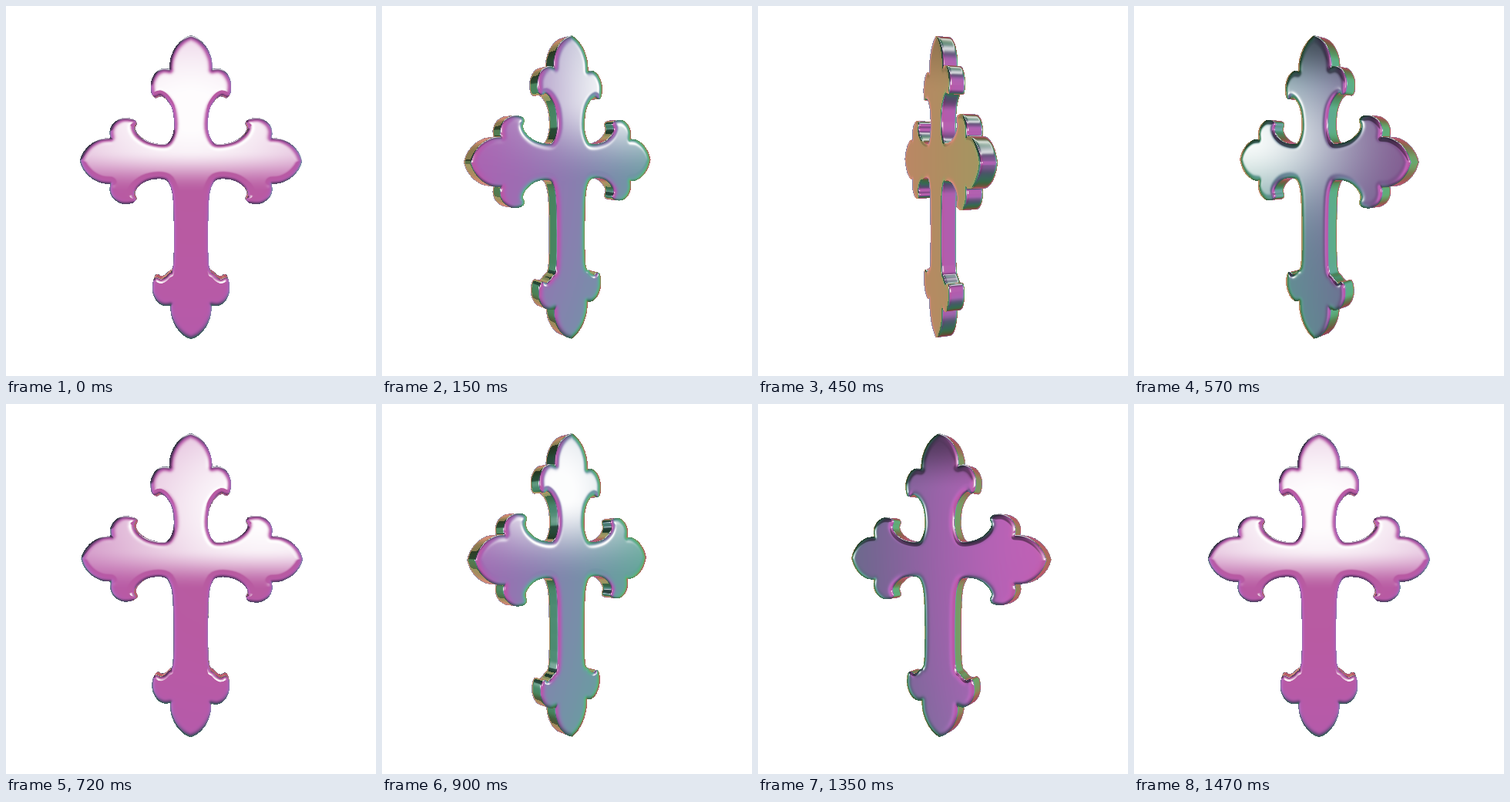
Write an HTML page with a canvas that moves like this. It is 480x480 px and loops after 1.5 s.

```html
<!DOCTYPE html>
<html>
<head>
<meta charset="utf-8">
<title>Turning cross</title>
<style>
html, body { margin: 0; width: 100%; height: 100%; overflow: hidden; background: #fff; }
canvas { display: block; }
</style>
</head>
<body>
<canvas id="stage" width="480" height="480"></canvas>
<script>
const ctx = document.getElementById('stage').getContext('2d');
const STEP = 30, LOOP = 1500, TURN_STEPS = 49;
const CENTER_X = 239.5, EYE_Y = 187, EYE_Z = 740, HALF = 10;
const BOX = { x: 88, y: 34, w: 304, h: 402 };
const GRID = { w: 170, h: 420, y: 25 };

// Half of one fleur end as [across, depth from tip]; all four arms share it.
const LOBE = [[0, 0], [10, 5], [20, 15.5], [26.5, 30], [28, 44]];
const EAR = [[28, 44], [37, 43.5], [46, 49], [52, 61], [51.5, 75], [47, 80.5], [40, 78], [31.5, 84], [24, 98]];

const clamp = (v, lo, hi) => v < lo ? lo : v > hi ? hi : v;
const bump = (v, mid, width) => Math.exp(-(((v - mid) / width) ** 2));
const smooth = (lo, hi, v) => {
  const t = clamp((v - lo) / (hi - lo), 0, 1);
  return t * t * (3 - 2 * t);
};

function spline(a, b, c, d, t) {
  return b + t / 2 * (c - a + t * (2 * a - 5 * b + 4 * c - d + t * (3 * (b - c) + d - a)));
}

// Right half of the outline: smooth runs that meet in corners.
function outlineRuns() {
  const top = ([a, d]) => [a, 37 + d];
  const upper = ([a, d]) => [144.5 - .9 * d, 200.5 - 1.07 * a];
  const lower = ([a, d]) => [144.5 - .9 * d, 200.5 + 1.07 * a];
  const bottom = ([a, d]) => [.96 * a, 432 - d];
  const back = (points, place) => points.map(place).reverse();
  return [
    LOBE.map(top),
    [...EAR.map(top), [22, 158], [28, 175], [38, 178.5], ...back(EAR, upper)],
    back(LOBE, upper),
    LOBE.map(lower),
    [...EAR.map(lower), [38, 224], [28, 231], [23, 258], ...back(EAR, bottom)],
    back(LOBE, bottom)
  ];
}

function traceOutline() {
  const path = [];
  for (const run of outlineRuns()) {
    for (let i = 0; i < run.length - 1; i++) {
      const p = [run[Math.max(i - 1, 0)], run[i], run[i + 1], run[Math.min(i + 2, run.length - 1)]];
      for (let k = 0; k < 4; k++) {
        path.push([0, 1].map(axis => spline(p[0][axis], p[1][axis], p[2][axis], p[3][axis], k / 4)));
      }
    }
  }
  path.push([0, 432]);
  return path;
}

function buildDistances() {
  const path = traceOutline(), out = new Float32Array(GRID.w * GRID.h);
  const edges = path.slice(1).map(([bx, by], i) => {
    const [ax, ay] = path[i], dx = bx - ax, dy = by - ay;
    return { ax, ay, by, dx, dy, inv: 1 / (dx * dx + dy * dy) };
  });
  for (let j = 0; j < GRID.h; j++) {
    const y = j + GRID.y;
    for (let x = 0; x < GRID.w; x++) {
      let best = 1e9, inside = false;
      for (const e of edges) {
        const px = x - e.ax, py = y - e.ay;
        const t = clamp((px * e.dx + py * e.dy) * e.inv, 0, 1);
        const qx = px - t * e.dx, qy = py - t * e.dy, q = qx * qx + qy * qy;
        if (q < best) best = q;
        if ((e.ay > y) !== (e.by > y) && px < py * e.dx / e.dy) inside = !inside;
      }
      out[j * GRID.w + x] = Math.sqrt(best) * (inside ? -1 : 1);
    }
  }
  return out;
}

const distances = buildDistances();

function distance(x, y) {
  x = clamp(Math.abs(x), 0, GRID.w - 1.01);
  y = clamp(y - GRID.y, 0, GRID.h - 1.01);
  const i = x | 0, j = y | 0, u = x - i, v = y - j, k = j * GRID.w + i;
  const top = distances[k] + (distances[k + 1] - distances[k]) * u;
  const low = distances[k + GRID.w] + (distances[k + GRID.w + 1] - distances[k + GRID.w]) * u;
  return top + (low - top) * v;
}

// Thin-film colour: each channel is a wave over the cosine of the viewing angle.
function film(cosine) {
  const wave = (mid, swing, peak, period) => mid + swing * Math.cos(2 * Math.PI * (cosine - peak) / period);
  return [wave(138, 46, .99, .78), wave(132, 42, .58, .78), wave(134, 44, .85, 1)];
}
const filmTable = Array.from({ length: 256 }, (_, i) => film(i / 255));

// Studio lights seen in the reflected direction (y points up).
function lights(x, y, z) {
  let white = 0, shade = 1 - .4 * smooth(.3, .9, Math.abs(y));
  if (z > 0) white += smooth(-.075, 0, y) * bump(y, .07, .25) * bump(x, 0, .35);
  if (x > 0) {
    white += smooth(-.06, .09, y) * bump(y, .1, .22) * bump(z, .17, .16);
  } else {
    const side = smooth(.3, .7, -x);
    white += side * .95 * bump(z, .03, .17) * bump(y, .02, .11);
    shade *= 1 - side * (.25 - .3 * smooth(.3, .65, z) - .17 * bump(z, .05, .2));
    shade *= 1 - side * .45 * smooth(.1, .2, y);
  }
  white += .75 * bump(y, .85, .09);
  const warm = z < -.5 ? .4 * smooth(0, -.3, x) : 0;
  return { white: Math.min(white, .98), shade, warm };
}

function normalAt(x, y, z, onFace) {
  const e = 2.5;
  let gx = distance(x + e, y) - distance(x - e, y);
  let gy = distance(x, y + e) - distance(x, y - e);
  const len = Math.hypot(gx, gy) || 1;
  gx /= len;
  gy /= len;
  let tilt;
  if (onFace) {
    const rim = clamp(1 + distance(x, y) / 12, 0, 1);
    tilt = .6 * rim ** 3;
  } else {
    const rim = clamp(Math.abs(z) / HALF * 2 - 1, 0, 1);
    tilt = Math.PI / 2 - .9 * rim ** 3;
  }
  const s = Math.sin(tilt);
  return [gx * s, gy * s, Math.cos(tilt) * Math.sign(z)];
}

function renderPose(angle) {
  const image = ctx.createImageData(BOX.w, BOX.h), data = image.data;
  const c = Math.cos(angle), s = Math.sin(angle);
  const ox = -EYE_Z * s, oz = EYE_Z * c, depth = HALF - EYE_Z;
  const glow = [255, 218, 140];
  data.fill(255);
  for (let j = 0; j < BOX.h; j++) {
    const dy = BOX.y + j - EYE_Y;
    for (let i = 0; i < BOX.w; i++) {
      const wx = BOX.x + i - CENTER_X;
      const dx = wx * c - depth * s, dz = wx * s + depth * c;
      const t1 = (HALF - oz) / dz, t2 = (-HALF - oz) / dz;
      const enter = Math.min(t1, t2), leave = Math.min(Math.max(t1, t2), 1.3);
      let t = Math.max(enter, .75), hit = false;
      const speed = Math.hypot(dx, dy);
      for (let n = 0; n < 80 && t <= leave; n++) {
        const gap = distance(ox + dx * t, EYE_Y + dy * t);
        if (gap < .05) { hit = true; break; }
        t += Math.max(gap, .1) / speed;
      }
      if (!hit) continue;

      const z = oz + dz * t, onFace = t === enter;
      const [nx, ny, nz] = normalAt(ox + dx * t, EYE_Y + dy * t, z, onFace);
      const ax = nx * c + nz * s, az = nz * c - nx * s;
      const len = Math.hypot(wx, dy, depth);
      const vx = -wx / len, vy = -dy / len, vz = -depth / len;
      const facing = ax * vx + ny * vy + az * vz;
      const k = 2 * facing;
      const light = lights(k * ax - vx, -(k * ny - vy), k * az - vz);
      const tint = filmTable[Math.round(clamp(facing, 0, 1) * 255)];
      const p = (j * BOX.w + i) * 4;
      for (let b = 0; b < 3; b++) {
        let value = tint[b] * light.shade;
        value += (glow[b] - value) * light.warm;
        data[p + b] = value + (255 - value) * light.white;
      }
    }
  }
  return image;
}

const poses = [];

function draw(now) {
  const step = Math.floor((now % LOOP) / STEP) % TURN_STEPS;
  if (!poses[step]) poses[step] = renderPose(step / TURN_STEPS * Math.PI * 2);
  ctx.putImageData(poses[step], BOX.x, BOX.y);
  requestAnimationFrame(draw);
}

ctx.fillStyle = '#fff';
ctx.fillRect(0, 0, 480, 480);
requestAnimationFrame(draw);
</script>
</body>
</html>
```
